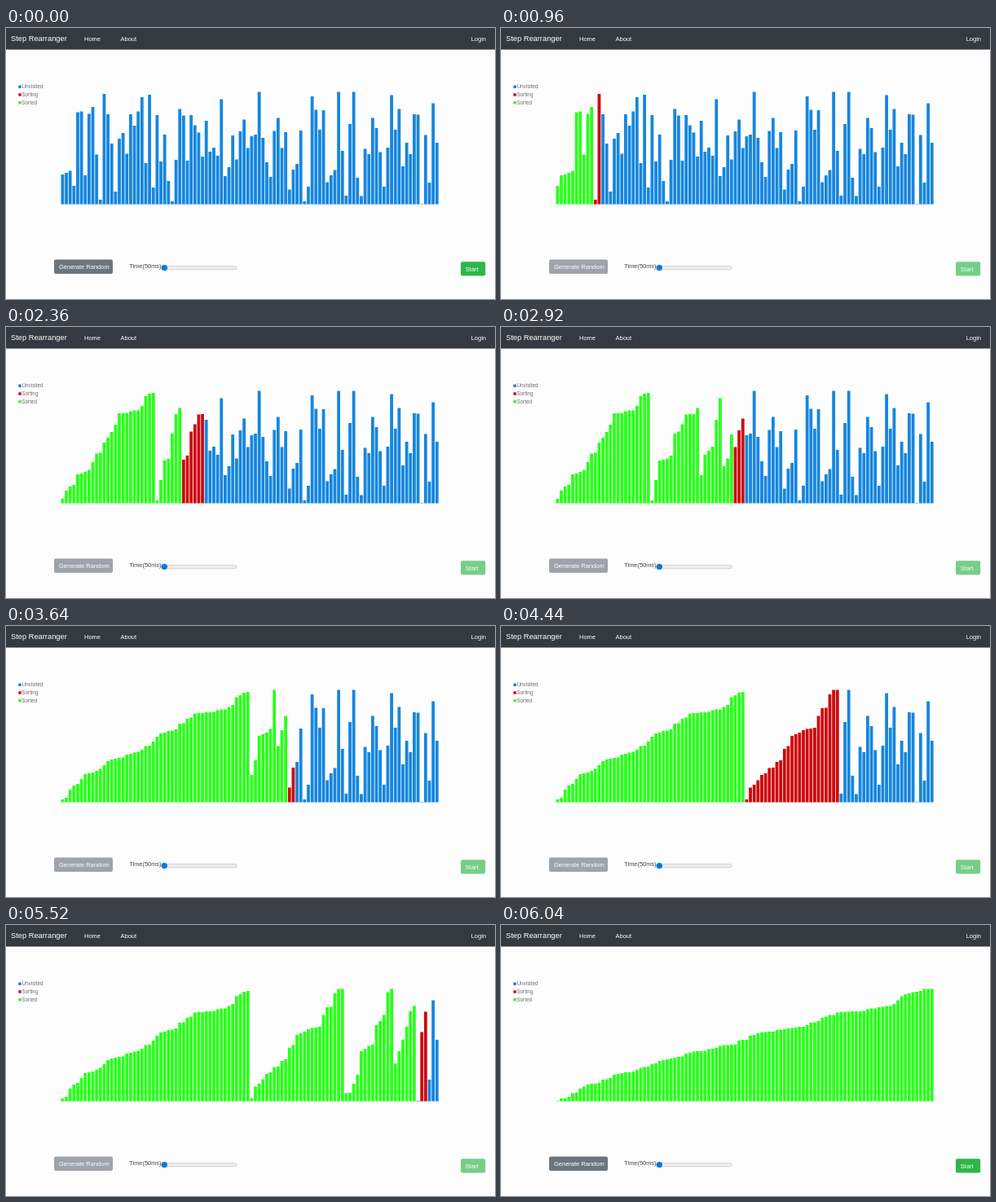
These frames come from a looping animation (600 by 333 pixels, 6080 ms). An HTML page:

```html
<!DOCTYPE html>
<html lang="en">
<head>
<meta charset="utf-8">
<title>Step Rearranger</title>
<style>
  html, body { margin: 0; width: 100%; height: 100%; overflow: hidden; background: #fdfdfe; }
  svg { display: block; width: 600px; height: 333px; font-family: "Liberation Sans", Arial, sans-serif; font-size: 7.5px; }
  .light { fill: #fff; }
  .legend { font-size: 6.4px; fill: #6e6e6e; }
  .busy .button { opacity: .65; }
</style>
</head>
<body>
<svg id="stage" viewBox="0 0 600 333">
  <rect width="600" height="26.5" fill="#343a40"/>
  <g class="light">
    <text x="6" y="16.3" font-size="9.3">Step Rearranger</text>
    <text x="96" y="16">Home</text>
    <text x="140.5" y="16">About</text>
    <text x="570.7" y="16">Login</text>
  </g>

  <g class="legend">
    <circle cx="17" cy="72.2" r="2" fill="#2a7fd8"/>
    <text x="19.4" y="74.4">Unvisited</text>
    <circle cx="17" cy="82" r="2" fill="#d8141c"/>
    <text x="19.2" y="84.2">Sorting</text>
    <circle cx="17" cy="91.8" r="2" fill="#46ee3a"/>
    <text x="19.2" y="94">Sorted</text>
  </g>

  <g id="bars"></g>

  <g class="button">
    <rect x="59" y="284.5" width="72" height="17.5" rx="2" fill="#6c757d"/>
    <text class="light" x="65" y="296">Generate Random</text>
  </g>
  <text x="151.3" y="295.4" font-size="7.4" fill="#454545">Time(50ms)</text>
  <rect x="190.8" y="292.7" width="92.4" height="4" rx="2" fill="#efefef" stroke="#b8b8b8" stroke-width=".6"/>
  <circle cx="194.3" cy="294.6" r="3.7" fill="#0a7ad8"/>
  <g class="button">
    <rect x="558" y="287.3" width="30.2" height="17.3" rx="2" fill="#2db64a"/>
    <text class="light" x="563.8" y="298.6">Start</text>
  </g>
</svg>
<script>
const LOOP = 6080, TICK = 40, CLICK = 420, STEP = 55;
const BASE = 216.6, LEFT = 67.5, PITCH = 4.64, WIDTH = 3.8;
const BLUE = '#1686de', RED = '#cd080e', GREEN = '#2aff1c';

const tops = [
  180, 178, 175.5, 194, 103.5, 102.5, 181, 105.5, 97, 155.5,
  211, 81, 106, 142, 201, 136, 129, 154.5, 106, 120,
  102.5, 85, 166, 82, 196, 107, 164, 131, 188, 213,
  162, 99.5, 107.5, 163, 107, 119.5, 128.5, 158, 114, 152,
  147, 157, 87.5, 182, 171, 132, 161.5, 127, 112.5, 147.5,
  133, 131, 78.5, 135, 165, 183, 126.5, 110.5, 147.5, 128,
  198.5, 174, 167, 126, 213, 195, 84, 100.5, 125, 101,
  189.5, 181, 174.5, 78.5, 151, 206, 118, 78.5, 184, 206.5,
  148.5, 155, 110.5, 123, 152.5, 195, 147, 82.5, 125, 99.5,
  170, 141, 155, 106, 106.5, 216.1, 131.5, 190, 92.5, 141
];

// Ranges in the order a recursive merge sort joins them.
const merges = [];
function split(lo, hi) {
  if (lo >= hi) return;
  const mid = (lo + hi) >> 1;
  split(lo, mid);
  split(mid + 1, hi);
  merges.push([lo, hi]);
}
split(0, tops.length - 1);

// Bars and colours after each merge; the newest range is red.
const states = [{ tops, colors: tops.map(() => BLUE) }];
for (const [lo, hi] of merges) {
  const last = states[states.length - 1];
  const part = last.tops.slice(lo, hi + 1).sort((a, b) => b - a);
  states.push({
    tops: [...last.tops.slice(0, lo), ...part, ...last.tops.slice(hi + 1)],
    colors: last.colors.map((c, i) => i >= lo && i <= hi ? RED : c === RED ? GREEN : c)
  });
}
states.push({ tops: states[states.length - 1].tops, colors: tops.map(() => GREEN) });

const stage = document.getElementById('stage');
const group = document.getElementById('bars');
const bars = tops.map((_, i) => {
  const bar = document.createElementNS('http://www.w3.org/2000/svg', 'rect');
  bar.setAttribute('x', LEFT + i * PITCH);
  bar.setAttribute('width', WIDTH);
  return group.appendChild(bar);
});

let shown = -1;
function draw(now) {
  const t = Math.floor((now % LOOP) / TICK) * TICK;
  const end = states.length - 1;
  const step = Math.max(0, Math.min(end, Math.floor((t - CLICK) / STEP)));
  stage.classList.toggle('busy', t >= CLICK && step < end);
  if (step !== shown) {
    const state = states[step];
    bars.forEach((bar, i) => {
      bar.setAttribute('y', state.tops[i]);
      bar.setAttribute('height', BASE - state.tops[i]);
      bar.setAttribute('fill', state.colors[i]);
    });
    shown = step;
  }
}

const start = performance.now();
function loop() {
  draw(performance.now() - start);
  requestAnimationFrame(loop);
}
loop();
</script>
</body>
</html>
```
